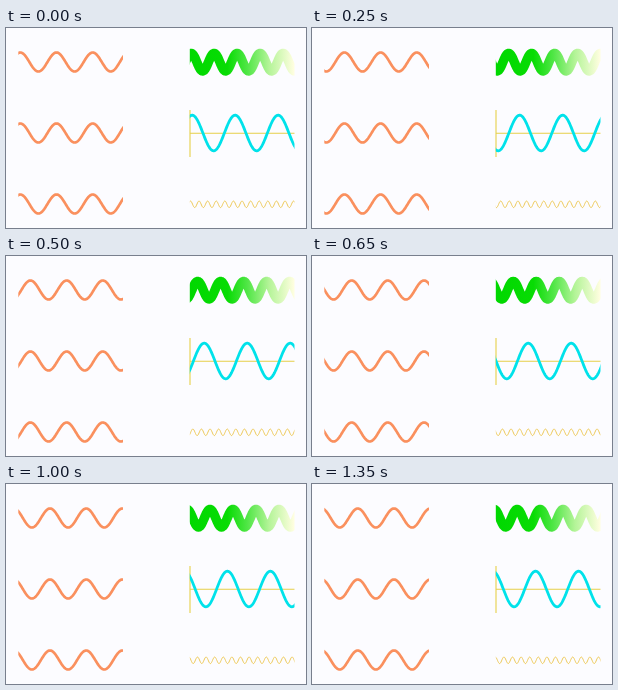
An HTML page for the animation above (1.4 s loop, 300 by 200 pixels).

```html
<!DOCTYPE html>
<html lang="en">
<head>
<meta charset="utf-8">
<title>Sine waves</title>
<style>
  html, body { margin: 0; width: 100%; height: 100%; overflow: hidden; background: #fcfcff; }
  svg { display: block; width: 300px; height: 200px; }
  path { fill: none; }
</style>
</head>
<body>
<svg viewBox="0 0 300 200">
  <defs>
    <linearGradient id="fade" gradientUnits="userSpaceOnUse" x1="184" y1="0" x2="288" y2="0">
      <stop offset="0" stop-color="#00d800"/>
      <stop offset=".36" stop-color="#08dc04"/>
      <stop offset=".55" stop-color="#50e646"/>
      <stop offset=".76" stop-color="#b4f498"/>
      <stop offset="1" stop-color="#fffee0"/>
    </linearGradient>
    <clipPath id="columns">
      <rect x="12.3" width="104.7" height="200"/>
      <rect x="183.8" width="104.7" height="200"/>
    </clipPath>
  </defs>
  <path d="M184 82V129M184 105.2H288.5" stroke="#e6d04a" stroke-width="1.1"/>
  <g id="waves" clip-path="url(#columns)" stroke-linejoin="round"></g>
</svg>
<script>
const STEP = 50, STEPS = 28, WIDTH = 104.5, OVERHANG = 5;

// [step, phase in turns]
const KEYS = [[0, .05], [2, .21], [5, .55], [8, 1.05], [13, 1.75], [16, 2.18], [20, 2.87], [27, 3.92], [28, 4.05]];

const orange = y => ({ x: 12.5, y, amp: 9.5, len: 36.2, width: 2.7, color: '#fa905e' });
const waves = [
  orange(34), orange(105), orange(176),
  { x: 184, y: 34.2, amp: 8.8, len: 23, width: 9.4, color: 'url(#fade)' },
  { x: 184, y: 105, amp: 17.8, len: 43, width: 2.8, color: '#00e2ea' },
  { x: 184, y: 176.3, amp: 3.3, len: 8.6, width: 1, color: '#ecc858' }
];

const group = document.getElementById('waves');
for (const w of waves) {
  w.path = document.createElementNS('http://www.w3.org/2000/svg', 'path');
  w.path.setAttribute('stroke', w.color);
  w.path.setAttribute('stroke-width', w.width);
  group.append(w.path);
}

function phaseAt(step) {
  const i = KEYS.findIndex(k => k[0] > step);
  const [s0, p0] = KEYS[i - 1], [s1, p1] = KEYS[i];
  return p0 + (p1 - p0) * (step - s0) / (s1 - s0);
}

function curve({ x, y, amp, len }, phase) {
  const points = [];
  for (let dx = -OVERHANG; dx <= WIDTH + OVERHANG; dx += .5) {
    const turn = dx / len - phase;
    points.push((x + dx) + ' ' + (y - amp * Math.cos(2 * Math.PI * turn)).toFixed(2));
  }
  return 'M' + points.join('L');
}

let shown = -1;
function draw(now) {
  const step = Math.floor(now / STEP) % STEPS;
  if (step !== shown) {
    shown = step;
    const phase = phaseAt(step);
    for (const w of waves) w.path.setAttribute('d', curve(w, phase));
  }
}

const start = performance.now();
function tick() {
  draw(performance.now() - start);
  requestAnimationFrame(tick);
}
tick();
</script>
</body>
</html>
```
